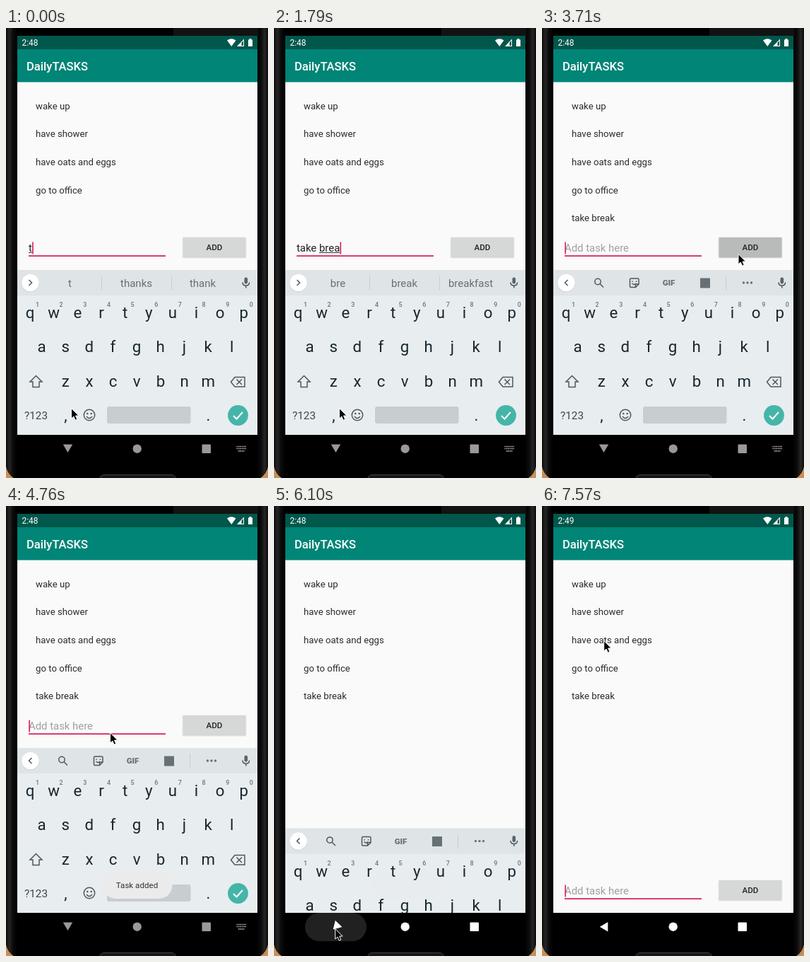
Recreate the animation shown at these times as an HTML page. Size 371 by 636 pixels, loop 8 s.

```html
<!DOCTYPE html>
<html lang="en">
<head>
<meta charset="utf-8">
<title>Task list</title>
<style>
html, body { margin: 0; width: 100%; height: 100%; overflow: hidden; background: #050505; }
svg { display: block; width: 100vw; height: 100vh; font-family: Roboto, sans-serif; }
text { white-space: pre; }
.mid { text-anchor: middle; }
.list { font-size: 13.2px; fill: #2b2b2b; }
.field { font-size: 14.9px; fill: #222; }
.word { font-size: 15px; fill: #667176; }
.key { font-size: 22.3px; fill: #17272e; }
.sup { font-size: 9px; font-weight: 500; fill: #6b777c; }
.line { fill: none; stroke: #4b595f; stroke-width: 1.5; }
</style>
</head>
<body>
<svg viewBox="0 0 371 636">
  <defs>
    <clipPath id="screen"><rect x="16" y="11" width="340" height="564"/></clipPath>
    <linearGradient id="edge">
      <stop offset="0" stop-color="#0a0a0a"/><stop offset=".3" stop-color="#262626"/>
      <stop offset=".6" stop-color="#0c0c0c"/><stop offset="1" stop-color="#000"/>
    </linearGradient>
  </defs>

  <!-- phone body -->
  <rect width="371" height="636" fill="#c89058"/>
  <path d="M0 0H371V619Q369 630 360 636H11Q2 630 0 619Z" fill="#000"/>
  <path id="side" d="M0 0H16V636H11Q2 630 0 619Z" fill="url(#edge)"/>
  <use href="#side" transform="translate(371 0) scale(-1 1)"/>
  <rect x="237" width="120" height="11" fill="#121212"/>
  <path d="M133 636Q134 631.500 139 631.500H234Q239 631.500 240 636" fill="#161616" stroke="#444"/>

  <g clip-path="url(#screen)">
    <rect x="16" y="76" width="340" height="499" fill="#fafafa"/>
    <rect x="16" y="30" width="340" height="46.500" fill="#008577"/>
    <rect x="16" y="11" width="340" height="19" fill="#00574b"/>
    <text id="clock" x="22.500" y="25" font-size="11.900" fill="#fff"></text>
    <g fill="#fff">
      <path d="M313 17.500Q319 13 325.500 17.500L319.300 26Z"/>
      <path d="M327 26H337V15.500ZM333.500 25H336V18L333.500 20.700Z" fill-rule="evenodd"/>
      <path d="M343 16.500H344.700V15H347.300V16.500H349V26H343Z"/>
    </g>
    <text x="29" y="60" font-size="16.600" font-weight="500" fill="#fff">DailyTASKS</text>
    <g id="list" class="list"></g>

    <g id="form">
      <text id="typed" class="field" x="32" y="315.500"></text>
      <rect id="composing" y="317" height="1" fill="#333"/>
      <rect id="caret" y="302.500" width="1.600" height="17" fill="#d81b60"/>
      <rect x="32" y="321.300" width="194" height="1.700" fill="#d81b60"/>
      <rect x="249.500" y="295.500" width="91" height="30" rx="2" fill="#000" opacity=".08"/>
      <rect x="250.500" y="296" width="89" height="28.500" rx="1.500" fill="#d6d7d7"/>
      <rect id="press" x="250.500" y="296" width="89" height="28.500" rx="1.500" fill="#555"/>
      <text class="mid" x="295" y="314" font-size="11.600" font-weight="500" fill="#222">ADD</text>
    </g>

    <g id="keyboard">
      <rect x="16" y="342" width="340" height="233" fill="#e8edf0"/>
      <rect x="16" y="342" width="340" height="36" fill="#dfe4e7"/>
      <circle cx="34.500" cy="360.500" r="12.700" fill="#000" opacity=".1"/>
      <circle cx="34.500" cy="360" r="12.300" fill="#fff"/>
      <path id="chevron" class="line" d="M32.500 356L36.500 360L32.500 364"/>
      <g id="words">
        <path d="M135.500 350V370M234.500 350V370" stroke="#c9ced1"/>
        <text class="word mid" x="90.500" y="366"></text>
        <text class="word mid" x="184.500" y="366"></text>
        <text class="word mid" x="278.500" y="366"></text>
      </g>
      <g id="tools" fill="#667176">
        <path d="M260.500 350V370" stroke="#c9ced1"/>
        <circle class="line" cx="79" cy="358.500" r="4.200"/><path class="line" d="M82 361.500L87 366.500"/>
        <path class="line" d="M126 354H135.500Q137 354 137 355.500V362L132.500 366.500H126Q124.500 366.500 124.500 365V355.500Q124.500 354 126 354ZM137 362H132.500V366.500M127.500 361Q130.500 364 133 361M128 357.500V359M133.500 357.500V359"/>
        <text class="mid" x="179.500" y="364" font-size="11.500" font-weight="900">GIF</text>
        <rect x="224" y="353.500" width="14" height="14"/>
        <circle cx="285.500" cy="360" r="1.700"/><circle cx="291" cy="360" r="1.700"/><circle cx="296.500" cy="360" r="1.700"/>
      </g>
      <rect x="337.500" y="352.500" width="4.600" height="9" rx="2.300" fill="#56646a"/>
      <path class="line" d="M335 359.500Q335 364 339.800 364T344.600 359.500M339.800 364V367.500"/>
      <g id="keys"></g>
      <path class="line" d="M42.500 491.500L51 500H47V507.500H38V500H34Z"/>
      <path class="line" d="M324 493.500H338V507H324L318.500 500.200ZM326.500 496.500L334 504M334 496.500L326.500 504"/>
      <text x="26" y="553" font-size="15.300" fill="#39484e">?123</text>
      <text class="key mid" x="84.500" y="555">,</text>
      <text class="key mid" x="286.500" y="555">.</text>
      <circle class="line" cx="118" cy="547" r="7.700"/>
      <path class="line" d="M114 549Q118 554 122 549"/>
      <circle cx="115.300" cy="545" r="1.300" fill="#4b595f"/><circle cx="120.700" cy="545" r="1.300" fill="#4b595f"/>
      <rect x="143" y="535" width="118.500" height="24" rx="3" fill="#c8cdd0"/>
      <circle cx="328.500" cy="547.500" r="14.400" fill="#45b5a9"/>
      <path d="M322 548L326.500 552.500L335 543" fill="none" stroke="#fff" stroke-width="2"/>
    </g>

    <g id="toast">
      <rect x="136.500" y="517" width="99" height="38" rx="19" fill="#ebebeb"/>
      <text class="mid" x="185.500" y="539.500" font-size="11.600" fill="#333">Task added</text>
    </g>
  </g>

  <!-- navigation bar -->
  <rect id="ripple" x="44" y="575" width="87" height="40" rx="20" fill="#fff"/>
  <g id="nav">
    <path id="back" d="M80.800 588.500H94.200L87.500 600Z"/>
    <circle cx="185.700" cy="594.700" r="6.200"/>
    <rect x="277.500" y="588.500" width="12.500" height="12.500" rx="1"/>
    <path id="keyIcon" d="M326.500 591.500H340M326.500 594.500H340M329 597.800H337.500" stroke="#a5a5a5" stroke-width="1.700" stroke-dasharray="1.700 .7"/>
  </g>
  <path id="pointer" d="M0 0V14.500L3.300 11.500L5.600 16.700L8.200 15.600L6 10.500H10.500Z" fill="#000" stroke="#fff"/>
</svg>
<script>
const $ = id => document.getElementById(id);
const LOOP = 8000, TICK = 148.5;
const ease = p => p * p * (3 - 2 * p);
const ramp = (t, a, b) => Math.min(1, Math.max(0, (t - a) / (b - a)));
const show = (id, on) => $(id).setAttribute("opacity", +on);
const move = (id, x, y) => $(id).setAttribute("transform", `translate(${x} ${y})`);

// time, field text, characters already committed, suggestions
const typing = [
  [0, "t", 0, "t thanks thank"],
  [150, "tak", 0, "t thanks thank"],
  [290, "take", 0, "take taken takes"],
  [590, "take ", 5, "take taken takes"],
  [740, "take ", 5, "a the it"],
  [1340, "take b", 5, "b be but"],
  [1640, "take bre", 5, "bre break breakfast"],
  [1790, "take brea", 5, "bre break breakfast"],
  [1930, "take break", 5, "brea break breakfast"],
  [2080, "take break", 5, "break breakfast breaks"],
  [3560, "", 0, ""]
];

// time, x, y of the pointer tip
const path = [
  [0, 92.5, 537.5], [2390, 92.5, 537.5], [3120, 278, 319.5], [4170, 278, 319.5],
  [4460, 215, 297], [4760, 147.5, 320.5], [5500, 86.7, 597.5], [6700, 86.7, 597.5], [7570, 87.7, 190.5]
];

const label = (s, x, y, cls) => `<text class="${cls}" x="${x}" y="${y}">${s}</text>`;
const row = (letters, x, y, cls) =>
  [...letters].map((c, i) => label(c, x + i * 33.65, y, cls + " mid")).join("");

$("keys").innerHTML = row("qwertyuiop", 34, 410, "key") + row("1234567890", 44.5, 394, "sup") +
  row("asdfghjkl", 50.5, 458, "key") + row("zxcvbnm", 84.3, 507, "key");
$("list").innerHTML = ["wake up", "have shower", "have oats and eggs", "go to office", "take break"]
  .map((s, i) => label(s, 42, Math.floor(115.1 + i * 39.65), "list")).join("");

const pen = document.createElement("canvas").getContext("2d");
pen.font = "14.9px Roboto, sans-serif";
const width = s => pen.measureText(s).width;

function pointerAt(t) {
  const i = path.findIndex(p => p[0] > t);
  if (i < 0) return path.at(-1).slice(1);
  const [a, x, y] = path[i - 1], [b, u, v] = path[i], p = ease(ramp(t, a, b));
  return [x + (u - x) * p, y + (v - y) * p];
}

function drawField(t) {
  const [, text, done, words] = typing.findLast(s => s[0] <= t);
  const start = width(text.slice(0, done)), end = width(text);
  $("typed").textContent = text || "Add task here";
  $("typed").style.fill = text ? "#222" : "#a0a0a0";
  $("composing").setAttribute("x", 32 + start);
  $("composing").setAttribute("width", end - start);
  $("caret").setAttribute("x", 32.3 + end);
  show("caret", t < 3560 || (t - 3560) % 1000 < 500);
  const list = words.split(" ");
  document.querySelectorAll("#words text").forEach((e, i) => e.textContent = list[i] || "");
}

function draw(time) {
  // the screen refreshes in even steps
  const t = Math.floor((time + 8) / TICK) * TICK + 8;
  drawField(t);
  $("clock").textContent = t < 6980 ? "2:48" : "2:49";
  show("press", t < 3410 ? 0 : 0.3 * (1 - ramp(t, 3560, 4160)));
  $("list").lastChild.setAttribute("opacity", +(t >= 3560));

  const tools = t >= 3700;
  show("tools", tools);
  show("words", !tools);
  $("chevron").setAttribute("transform", tools ? "rotate(180 34.5 360)" : "");
  move("keyboard", 0, 233 * ramp(t, 5960, 6240));
  move("form", 0, t < 6090 ? 0 : 233);
  show("toast", ramp(t, 4270, 4460) * (1 - 0.8 * ramp(t, 5640, 5950) - 0.2 * ramp(t, 5950, 6100)));

  show("ripple", 0.18 * ramp(t, 5500, 5800) * (1 - 0.6 * ramp(t, 5960, 6250) - 0.4 * ramp(t, 6250, 6690)));
  const shade = 153 + 102 * ramp(t, 5640, 5950);
  $("nav").setAttribute("fill", `rgb(${shade},${shade},${shade})`);
  $("back").setAttribute("transform", `rotate(${90 * ramp(t, 5960, 6240)} 87.3 594.5)`);
  show("keyIcon", t < 6090);
  move("pointer", ...pointerAt(t));
}

function loop() {
  draw(performance.now() % LOOP);
  requestAnimationFrame(loop);
}
loop();
</script>
</body>
</html>
```
